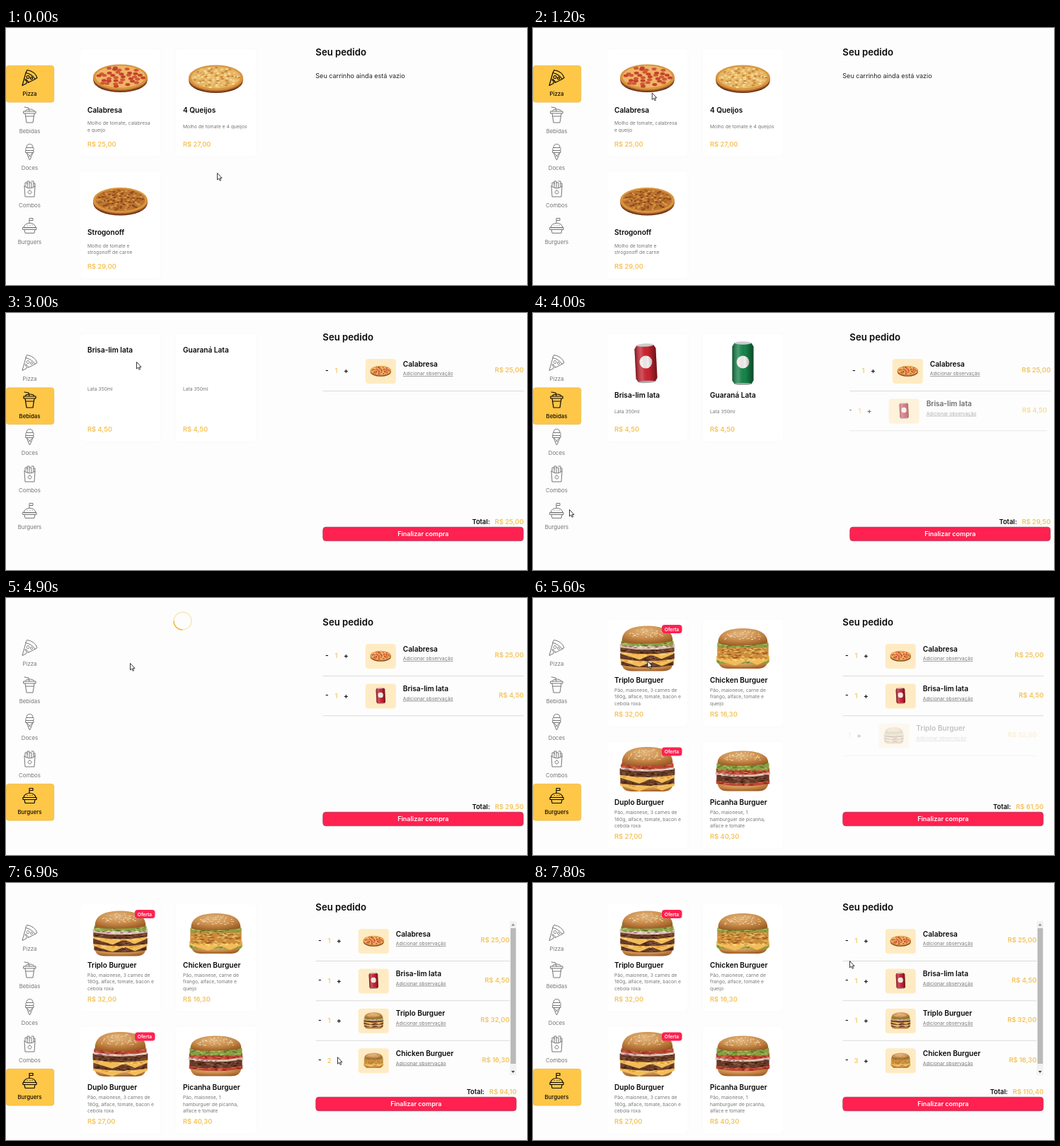
Recreate the animation shown at these times as an HTML page. Size 736 px wide and 364 px high, loop 8000 ms.

```html
<!DOCTYPE html>
<html lang="pt-BR">
<head>
<meta charset="utf-8">
<title>Cardápio</title>
<style>
html, body { margin: 0; width: 100%; height: 100%; overflow: hidden; background: #fdfdfd; }
svg { display: block; }
text { font-family: Inter, "Open Sans", sans-serif; }
.icon { fill: none; stroke-linejoin: round; stroke-linecap: round; }
</style>
</head>
<body>
<svg width="736" height="364" viewBox="0 0 736 364">
  <defs>
    <clipPath id="list"><rect y="50" width="285" height="222"/></clipPath>
    <linearGradient id="shade">
      <stop offset="0" stop-opacity=".4"/>
      <stop offset=".3" stop-color="#fff" stop-opacity=".2"/>
      <stop offset=".6" stop-opacity="0"/>
      <stop offset="1" stop-opacity=".45"/>
    </linearGradient>
    <radialGradient id="bun" cx=".45" cy=".3" r=".75">
      <stop offset="0" stop-color="#e2b47c"/>
      <stop offset=".5" stop-color="#cc8f4e"/>
      <stop offset="1" stop-color="#985720"/>
    </radialGradient>
  </defs>
  <g id="scene"></g>
</svg>
<script>
const LOOP = 8000, TICK = 100, FADE = 850;
const YELLOW = '#f5c35a', PINK = '#ff2150', INK = '#080808', GREY = '#777';
const ROW = 173.5;

const text = (x, y, size, weight, fill, str, extra = '') =>
  `<text x="${x}" y="${y}" font-size="${size}" font-weight="${weight}" fill="${fill}" ${extra}>${str}</text>`;
const rect = (x, y, w, h, fill, r = 0, extra = '') =>
  `<rect x="${x}" y="${y}" width="${w}" height="${h}" rx="${r}" fill="${fill}" ${extra}/>`;
const oval = (x, y, rx, ry, fill) =>
  `<ellipse cx="${x.toFixed(1)}" cy="${y.toFixed(1)}" rx="${rx}" ry="${ry}" fill="${fill}"/>`;
const path = (d, extra = '') => `<path d="${d}" ${extra}/>`;
const group = (x, y, body, extra = '') => `<g transform="translate(${x} ${y})" ${extra}>${body}</g>`;
const money = v => 'R$ ' + v.toFixed(2).replace('.', ',');
const END = 'text-anchor="end"', MID = 'text-anchor="middle"';

function random(seed) {
  return () => (seed = seed * 16807 % 2147483647) / 2147483647;
}

// Food pictures, centred on 0,0
function pizza(cheese, toppings, count, size) {
  const rnd = random(count * 31);
  let out = oval(0, 4, 38, 16.5, '#63301a') + oval(0, 1.5, 38.5, 17.5, '#a85c24') +
    oval(0, -1, 38.5, 18, '#d8953f') + oval(0, -1.5, 35, 15.5, cheese);
  for (let i = 0; i < count; i++) {
    const r = Math.sqrt((i + .5) / count), a = i * 2.4 + rnd() * .4;
    out += oval(Math.cos(a) * r * 33, Math.sin(a) * r * 14.5 - 1.5, size, size * .58,
      toppings[i % toppings.length]);
  }
  return out;
}

// Filling: base, light and dark tones
const LAYERS = {
  l: ['#87a043', '#b9c56c', '#56732b'],
  p: ['#663a27', '#8d5a40', '#3f2015'],
  c: ['#f2bd58', '#f9d98d', '#dd9230'],
  t: ['#bd4532', '#dc7457', '#8c2a20'],
  o: ['#d8bfae', '#f0e4d4', '#a4617a'],
  f: ['#cc8c3a', '#e9bd69', '#9c5a1d']
};

function filling(kind, w, y, h, rnd) {
  const [base, light, dark] = LAYERS[kind], sag = 3;
  let edge = `Q0 ${y + h + sag * 2} ${-w} ${y + h}`;
  if (kind === 'c') edge = `L${w * .55} ${y + h + 7} L${w * .15} ${y + h + 1} L${-w * .3} ${y + h + 8} L${-w} ${y + h}`;
  if ('lf'.includes(kind)) edge = `q${-w / 11} 5 ${-w * 2 / 11} 0`.repeat(11);
  let out = path(`M${-w} ${y} Q0 ${y + sag} ${w} ${y} V${y + h} ${edge} Z`,
    `fill="${base}" stroke="${base}" stroke-width="1.5" stroke-linejoin="round"`);
  for (let i = 0; i < h * 5; i++) {
    const x = (rnd() * 2 - 1) * w * .95;
    out += oval(x, y + rnd() * h + sag * (1 - x * x / w / w), 1.5 + rnd() * 2, .8, i % 2 ? light : dark);
  }
  return out;
}

function burger(w, bunHeight, spec, heel) {
  const rnd = random(w * bunHeight);
  const layers = spec.split(' ').map(s => [s[0], +s.slice(1)]);
  const total = layers.reduce((sum, [, h]) => sum + h, bunHeight + heel);
  const top = -total / 2, bw = w * .92, base = top + bunHeight;
  let y = base, parts = [];
  for (const [kind, h] of layers) {
    parts.unshift(filling(kind, w * (.93 + rnd() * .05), y, h, rnd));
    y += h;
  }
  const bottom = path(`M${-bw} ${y - 2} H${bw} Q${bw} ${y + heel} ${w * .55} ${y + heel} H${-w * .55} Q${-bw} ${y + heel} ${-bw} ${y - 2} Z`,
    'fill="url(#bun)"');
  let crown = path(`M${-bw} ${base - 1} C${-bw} ${top + 4} ${-w * .45} ${top} 0 ${top} S${bw} ${top + 4} ${bw} ${base - 1} Q${bw * .9} ${base + 2} 0 ${base + 3} T${-bw} ${base - 1} Z`,
    'fill="url(#bun)"');
  for (let i = 0; i < 60; i++) {
    const a = rnd() * Math.PI, r = Math.sqrt(rnd());
    crown += oval(Math.cos(a) * r * w * .7, base - (.25 + Math.sin(a) * r * .65) * bunHeight, .9, .6, '#efd9b0');
  }
  return bottom + parts.join('') + crown;
}

function can(color, h, tilt) {
  const outline = `M-12 ${-h} H12 L15 ${-h + 5} V${h - 5} L12 ${h} H-12 L-15 ${h - 5} V${-h + 5} Z`;
  return `<g transform="rotate(${tilt})">` + path(outline, `fill="${color}"`) +
    oval(0, -2, 9, 9, '#f4eeee') + path(outline, 'fill="url(#shade)"') +
    oval(0, -h, 12, 2.2, '#c9cbcc') + oval(0, h, 12, 1.6, '#a3a6a8') + '</g>';
}

const item = (name, desc, price, art, dx = 0, dy = 0, offer = false) =>
  ({ name, desc: desc.split('|'), price, art, dx, dy, offer });

const pizzas = [
  item('Calabresa', 'Molho de tomate, calabresa|e queijo', 25, pizza('#efb566', ['#c4432b', '#d2573a'], 36, 3.5), 0, -1),
  item('4 Queijos', 'Molho de tomate e 4 queijos', 27, pizza('#e6b462', ['#f4dc9c', '#eec67c', '#c98a3c'], 90, 2.2)),
  item('Strogonoff', 'Molho de tomate e|strogonoff de carne', 29, pizza('#bd7530', ['#8a481b', '#d99b4a', '#a55a22'], 110, 2))
];
const drinks = [
  item('Brisa-lim lata', 'Lata 350ml', 4.5, can('#cb2430', 26, -3), -2),
  item('Guaraná Lata', 'Lata 350ml', 4.5, can('#17854a', 29, 0))
];
const burgers = [
  item('Triplo Burguer', 'Pão, maionese, 3 carnes de|180g, alface, tomate, bacon e|cebola roxa', 32,
    burger(39, 22, 'l4 o4 p6 c3 p7 c3 p6', 9), 0, 0, true),
  item('Chicken Burguer', 'Pão, maionese, carne de|frango, alface, tomate e|queijo', 16.3,
    burger(38, 21, 'l3 f16 c4 l3', 10)),
  item('Duplo Burguer', 'Pão, maionese, 3 carnes de|180g, alface, tomate, bacon e|cebola roxa', 27,
    burger(39, 24, 't4 o3 p8 c4 p8 c3', 9), 0, -2.5, true),
  item('Picanha Burguer', 'Pão, maionese, 1|hamburguer de picanha,|alface e tomate', 40.3,
    burger(39, 18, 'l7 t5 o3 p9 t4', 11))
];

// Icons on a 24 by 24 field
const tabs = [
  ['Pizza', 'M9 1 Q20 3 23 12 L20 14 Q16 7 7 5 Z M7 5 L2 23 L8 20 V17 Q9 15 10 17 V19 L20 14 M10 9 a2 2 0 1 0 .1 0 M15 11 a1.6 1.6 0 1 0 .1 0 M7 14 a1 1 0 1 0 .1 0'],
  ['Bebidas', 'M4 10 H21 V7 H4 Z M6 7 Q7 4 12.500 4 Q18 4 19 7 M6 10 L8 23 H17 L19 10 M12 7 L11 2 L5 1 M7 14 H18'],
  ['Doces', 'M8 13 L12 23 H13 L17 13 M7 10 H18 V13 H7 Z M8 10 Q5 8 8 6 Q8 1 12.500 1 Q17 1 17 6 Q20 8 17 10 M8 6 H17 M9 14 L14 19 M16 14 L11 19'],
  ['Combos', 'M5 8 L6 23 H19 L20 8 Q12.500 14 5 8 Z M6 8 V3 H9 V10 M9 5 V1 H12 V10 M12 3 H15 V10 M15 1 H18 V9 M18 4 H20 V8 M12.500 14 a2.500 2.500 0 1 0 .1 0'],
  ['Burguers', 'M4 14 Q5 8 12.500 8 Q20 8 21 14 Z M3 14 H22 V17 H3 Z M5 17 L6 22 H19 L20 17 M12 8 V1 H17 V4 H12 M9 11 h.1 M13 11 h.1 M16 11 h.1']
];

const sidebar = active => tabs.map(([label, d], i) => {
  const on = i === active, y = 53 + i * 52.5;
  return (on ? rect(.3, y + .4, 67.4, 51.7, '#ffc747', 3.5, 'stroke="#e9b84a" stroke-width=".8"') : '') +
    group(21, y + 5.5, path(d, `class="icon" stroke="${on ? INK : GREY}" stroke-width="${on ? 1.2 : 1}"`)) +
    text(33.5, y + 43.3, 7.8, on ? 500 : 400, on ? INK : GREY, label, MID);
}).join('');

function card(it, i, loaded) {
  const nameY = loaded ? 119.5 : 56, descY = loaded ? 142 : 110;
  const lines = it.desc.map((s, k) =>
    text(11, descY + (k - (it.desc.length - 1) / 2) * 9.5, 6.75, 400, GREY, s)).join('');
  return group(104 + i % 2 * 135, Math.floor(i / 2) * ROW,
    rect(0, 29, 115, 153, '#fff', 5, 'stroke="#fafafa"') +
    (loaded ? group(57.5 + it.dx, 71.5 + it.dy, it.art) : '') +
    text(11, nameY, 10.1, 600, INK, it.name) + lines +
    text(11, 167.5, 9.3, 600, YELLOW, money(it.price)) +
    (it.offer && loaded ? rect(78, 38, 28.5, 12, PINK, 4) + text(92, 46.5, 6.6, 600, '#fff', 'Oferta', MID) : ''));
}

const spinner = t => group(249.5, 32.5,
  '<circle r="12.5" fill="none" stroke="#f9e7bb" stroke-width="1.5"/>' +
  `<path d="M0 12.5 A12.5 12.5 0 0 1 -12.5 0" transform="rotate(${(t - 4900) * .36})" fill="none" stroke="#f2bf50" stroke-width="1.7"/>`);

const menus = [
  { items: pizzas, tab: 0, start: 0, text: 0, art: 0 },
  { items: drinks, tab: 1, start: 2300, text: 2800, art: 3200 },
  { items: burgers, tab: 4, start: 4300, text: 5000, art: 5100 }
];
const orders = [
  { it: pizzas[0], at: 1500, zoom: .38 },
  { it: drinks[0], at: 3500, zoom: .42 },
  { it: burgers[0], at: 5400, zoom: .36 },
  { it: burgers[1], at: 6000, zoom: .37, more: [6900, 7200] }
];
const quantity = (order, t) => 1 + (order.more || []).filter(at => t >= at).length;

function orderRow(order, i, t, width) {
  const p = Math.min(1, (t - order.at) / FADE), y = 82 + i * 56.4;
  return group(-12.5 * (1 - p), y,
    text(6, 3, 10, 600, INK, '-', MID) +
    text(19.3, 3.4, 9.6, 500, YELLOW, quantity(order, t), MID) +
    text(33, 3.4, 10, 600, INK, '+', MID) +
    rect(60.5, -17, 43, 35, '#ffebc3', 4) +
    `<g transform="translate(82 0) scale(${order.zoom})">${order.it.art}</g>` +
    text(113.5, -6.5, 10.1, 600, INK, order.it.name) +
    text(113.5, 6.3, 6.85, 400, GREY, 'Adicionar observação', 'text-decoration="underline"') +
    text(width, 2.3, 9.3, 600, YELLOW, money(order.it.price), END) +
    rect(0, 28, width, .8, '#d2d2d2'), `opacity="${p}"`);
}

const scrollbar = rect(274.5, 54, 9, 218, '#f1f1f1') + rect(275.5, 64, 7.5, 192, '#b9b9b9') +
  path('M276.500 60.500 h5 l-2.500 -3 Z', 'fill="#888"') + path('M276.500 266 h5 l-2.500 3 Z', 'fill="#444"');

function cart(t) {
  const rows = orders.filter(o => t >= o.at);
  const title = text(0, 38.5, 13.2, 600, INK, 'Seu pedido');
  if (!rows.length) return title + text(0, 71.3, 9.05, 400, '#222', 'Seu carrinho ainda está vazio');
  const scrolls = rows.length > 3, width = scrolls ? 274 : 284;
  const total = rows.reduce((sum, o) => sum + o.it.price * quantity(o, t), 0);
  return title +
    `<g clip-path="url(#list)">${rows.map((o, i) => orderRow(o, i, t, width)).join('')}</g>` +
    (scrolls ? scrollbar : '') +
    text(284, 298.6, 9.3, 600, INK, `Total:<tspan dx="7" fill="${YELLOW}">${money(total)}</tspan>`, END) +
    rect(.5, 303.3, 283, 19.4, PINK, 4, 'stroke="#b83a5e" stroke-width=".9"') +
    text(142, 316, 9, 600, '#fff', 'Finalizar compra', MID);
}

// time, x, y
const route = [
  [0, 298, 205], [600, 215, 150], [1300, 165, 88], [1500, 158, 90], [2000, 63, 137],
  [2300, 40, 130], [2500, 48, 128], [3000, 184, 69], [3400, 165, 80], [3500, 160, 84],
  [4000, 51, 278], [4200, 38, 286], [4400, 44, 282], [4900, 175, 92], [5400, 158, 88],
  [5800, 165, 90], [6000, 285, 95], [6300, 352, 122], [6800, 468, 246], [7300, 468, 248],
  [7600, 454, 132], [7800, 447, 110], [8000, 447, 110]
];

function cursor(t) {
  const k = route.findIndex(p => p[0] > t), [t0, x0, y0] = route[k - 1], [t1, x1, y1] = route[k];
  const f = (t - t0) / (t1 - t0), s = f * f * (3 - 2 * f);
  return group(x0 + (x1 - x0) * s, y0 + (y1 - y0) * s,
    path('M.5 .5 V10 L2.700 8 L4.200 11.300 L5.700 10.600 L4.300 7.500 H7 Z', 'fill="#fff" stroke="#222" stroke-width=".9"'));
}

const scene = document.getElementById('scene');
let shown = -1;

function draw(now) {
  const t = Math.floor(now % LOOP / TICK) * TICK;
  if (t !== shown) {
    shown = t;
    const menu = menus.filter(m => t >= m.start).pop(), ready = t >= menu.text;
    const panelX = ready && menu.items.length > 2 ? 437.3 : 447.3;
    scene.innerHTML = sidebar(menu.tab) +
      (ready ? menu.items.map((it, i) => card(it, i, t >= menu.art)).join('') : spinner(t)) +
      group(panelX, 0, cart(t)) + cursor(t);
  }
  requestAnimationFrame(draw);
}
draw(performance.now());
</script>
</body>
</html>
```
